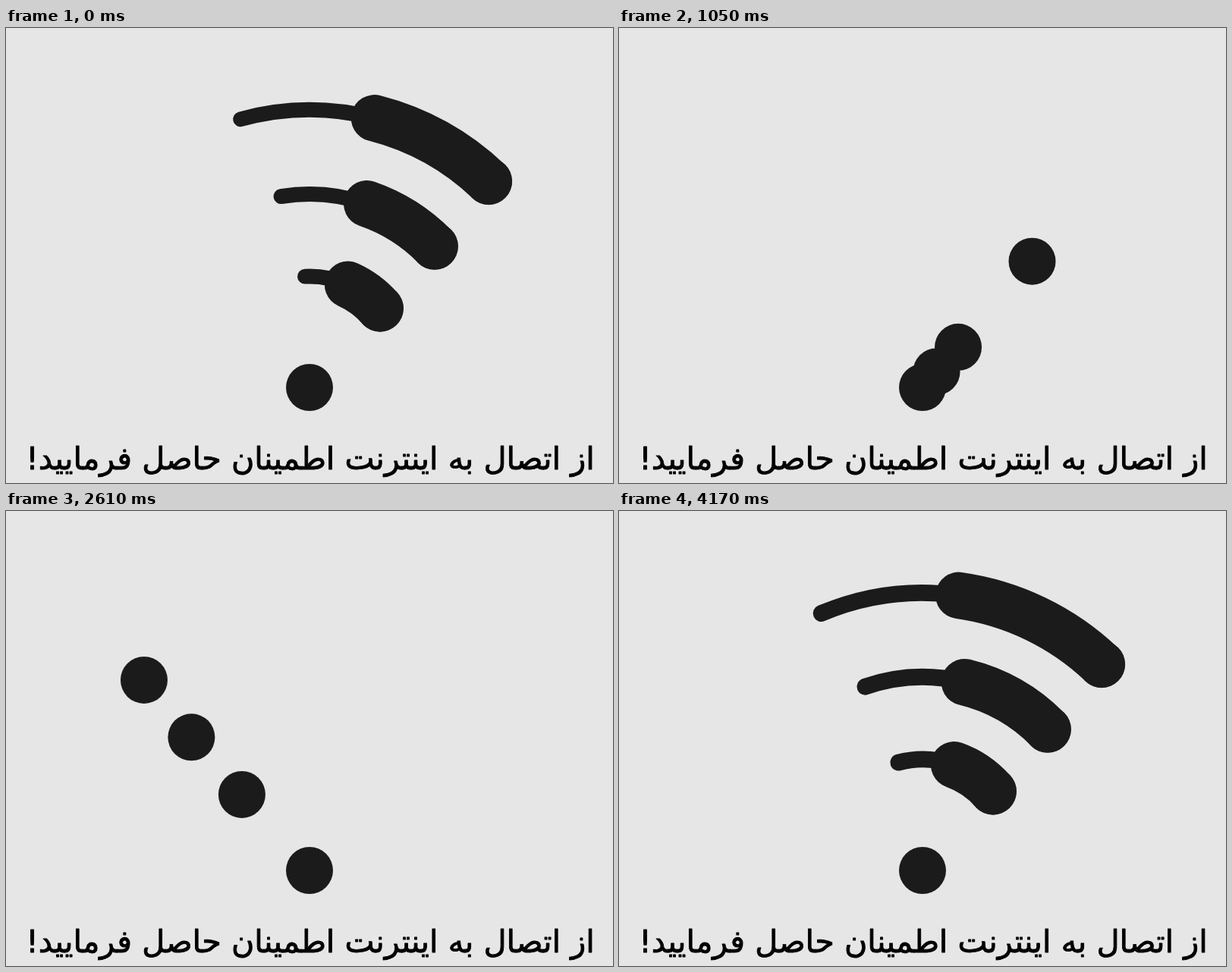
An HTML page with a canvas for the animation above (4.2 s loop, 800x600 px).

```html
<!DOCTYPE html>
<html lang="fa">
<head>
<meta charset="utf-8">
<style>
html, body { margin: 0; width: 100%; height: 100%; overflow: hidden; background: #e6e6e6; }
canvas { display: block; }
</style>
</head>
<body>
<canvas id="stage" width="800" height="600"></canvas>
<script>
const ctx = document.getElementById('stage').getContext('2d');
const LOOP = 4200, CX = 400, CY = 451, DOT_Y = 474, BALL = 31, THICK = 61.5, INK = '#1b1b1b';
const RAD = Math.PI / 180;
const TEXT = 'از اتصال به اینترنت اطمینان حاصل فرمایید!';

// Per arc: radius, half angle, and the easing handles [x1, x2] of each move
const arcs = [
  { r: 343, half: 43.5, out: [.8, .05], back: [.66, .23], head: [.565, .15], tail: [.55, .11], thin: [.763, .15] },
  { r: 232, half: 45.3, out: [.49, .09], back: [.61, .13], head: [.63, .1], tail: [.5, .09], thin: [.718, .154] },
  { r: 123.5, half: 48.8, out: [.38, 0], back: [.62, 0], head: [.665, .1], tail: [.45, .064], thin: [.689, .14] }
];

// cubic-bezier(x1, 0, x2, 1) over the span from start to end
function ease(t, start, end, [x1, x2]) {
  const u = (t - start) / (end - start);
  if (u <= 0) return 0;
  if (u >= 1) return 1;
  let lo = 0, hi = 1, s = .5;
  for (let i = 0; i < 24; i++) {
    s = (lo + hi) / 2;
    const x = 3 * (1 - s) * s * ((1 - s) * x1 + s * x2) + s * s * s;
    if (x < u) lo = s; else hi = s;
  }
  return s * s * (3 - 2 * s);
}

function ball(x, y) {
  ctx.beginPath();
  ctx.arc(x, y, BALL, 0, 2 * Math.PI);
  ctx.fill();
}

// Angles are in degrees from straight up
const point = (r, a) => [CX + r * Math.sin(a * RAD), CY - r * Math.cos(a * RAD)];

function stroke(r, from, to, width) {
  if (to <= from) return;
  ctx.lineWidth = width;
  ctx.beginPath();
  ctx.arc(CX, CY, r, (from - 90) * RAD, (to - 90) * RAD);
  ctx.stroke();
}

// Ball on the straight line between an arc end and the dot
function slide(r, angle, k) {
  const [x, y] = point(r, angle);
  ball(CX + (x - CX) * k, DOT_Y + (y - DOT_Y) * k);
}

function drawArc(a, t) {
  const { r, half } = a;
  if (t < 1675) return slide(r, half, 1 - ease(t, 600, 1650, a.out));
  if (t < 3000) return slide(r, -half, ease(t, 1700, 3000, a.back));
  const angle = k => half * (2 * k - 1);
  const head = angle(ease(t, 3000, 4000, a.head));
  const tail = angle(ease(t, 3750, 4800, a.tail));
  const thin = angle(ease(t, 3750, 4800, a.thin));
  stroke(r, thin, tail, Math.min(THICK, 20 * Math.exp((LOOP - t) / 315)));
  stroke(r, tail, head, THICK);
  ball(...point(r, head));
}

function drawText() {
  ctx.fillStyle = ctx.strokeStyle = '#000';
  ctx.font = '41.4px "DejaVu Sans", sans-serif';
  ctx.direction = 'rtl';
  ctx.textAlign = 'center';
  ctx.lineWidth = .9;
  ctx.fillText(TEXT, 401, 582);
  ctx.strokeText(TEXT, 401, 582);
}

function draw(now) {
  let t = now % LOOP;
  if (t < 600) t += LOOP;
  ctx.fillStyle = '#e6e6e6';
  ctx.fillRect(0, 0, 800, 600);
  ctx.fillStyle = ctx.strokeStyle = INK;
  ctx.lineCap = ctx.lineJoin = 'round';
  for (const a of arcs) drawArc(a, t);
  ball(CX, DOT_Y);
  drawText();
}

const begin = performance.now();
function tick() {
  draw(performance.now() - begin);
  requestAnimationFrame(tick);
}
tick();
</script>
</body>
</html>
```
